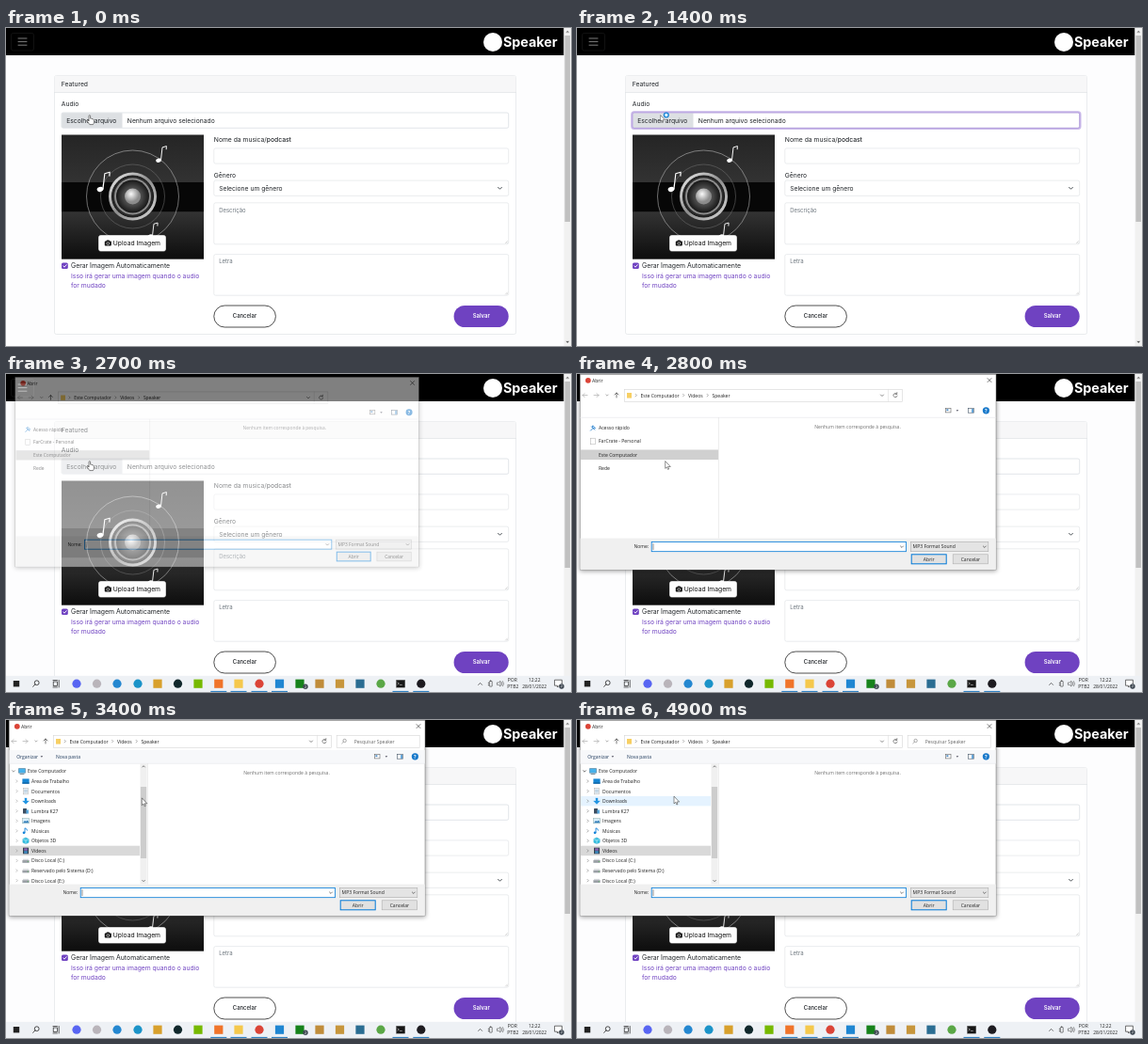
Animation of 600x338 px, one loop 5 s. Source, as an HTML page:

```html
<!DOCTYPE html>
<html lang="pt-BR">
<head>
<meta charset="utf-8">
<title>Envio de áudio</title>
<style>
  html, body { margin: 0; width: 100%; height: 100%; overflow: hidden; background: #fdfdfe; }
  svg { display: block; width: 100vw; height: 100vh; }
  text { white-space: pre; }
  .web { font-family: Inter, "Open Sans", sans-serif; }
  .sys { font-family: "Open Sans", "Noto Sans", sans-serif; }
</style>
</head>
<body>
<svg id="stage" viewBox="0 0 600 338" preserveAspectRatio="none"></svg>
<script>
const PURPLE = '#6f42c1', LINE = '#dcdfe3', BLUE = '#0078d7';

// Shape helpers
const rect = (x, y, w, h, fill, stroke = 'none', r = 0, sw = .6) =>
  `<rect x="${x}" y="${y}" width="${w}" height="${h}" rx="${r}" fill="${fill}" stroke="${stroke}" stroke-width="${sw}"/>`;
const circle = (x, y, r, fill, stroke = 'none', sw = .6) =>
  `<circle cx="${x}" cy="${y}" r="${r}" fill="${fill}" stroke="${stroke}" stroke-width="${sw}"/>`;
const path = (d, stroke, sw = .7, fill = 'none') =>
  `<path d="${d}" fill="${fill}" stroke="${stroke}" stroke-width="${sw}" stroke-linecap="round" stroke-linejoin="round"/>`;
const label = (cls, x, y, s, size, fill, weight, anchor = 'start') =>
  `<text class="${cls}" x="${x}" y="${y}" font-size="${size}" fill="${fill}" font-weight="${weight}" text-anchor="${anchor}">${s}</text>`;
const web = (x, y, s, size = 6.75, fill = '#212529', weight = 400, anchor) =>
  label('web', x, y, s, size, fill, weight, anchor);
const sys = (x, y, s, size = 5.05, fill = '#222', anchor) =>
  label('sys', x, y, s, size, fill, 400, anchor);
const group = (id, s, attrs = '') => `<g id="${id}" ${attrs}>${s}</g>`;
const at = (x, y, s) => `<g transform="translate(${x} ${y})">${s}</g>`;
const down = (x, y, c = '#444', k = 1.6, sw = .7) => path(`M${x - k} ${y - k / 2}l${k} ${k}l${k} ${-k}`, c, sw);
const right = (x, y, c = '#777', k = 1.3) => path(`M${x - k / 2} ${y - k}l${k} ${k}l${-k} ${k}`, c, .6);
const lens = (x, y, r, c, sw) => circle(x, y, r, 'none', c, sw) + path(`M${x - r * .7} ${y + r * .7}l${-r} ${r}`, c, sw);

const defs = `<defs>
  <linearGradient id="wall" x2="0" y2="1"><stop stop-color="#252525"/><stop offset="1" stop-color="#484848"/></linearGradient>
  <linearGradient id="floor" x2="0" y2="1"><stop stop-color="#333"/><stop offset="1" stop-color="#0d0d0d"/></linearGradient>
  <linearGradient id="rim" x2="1" y2="1"><stop stop-color="#f2f2f2"/><stop offset=".5" stop-color="#8d8d8d"/><stop offset="1" stop-color="#dedede"/></linearGradient>
  <radialGradient id="cone"><stop stop-color="#777"/><stop offset=".6" stop-color="#444"/><stop offset="1" stop-color="#171717"/></radialGradient>
  <radialGradient id="cap" cx=".4" cy=".35"><stop stop-color="#fafafa"/><stop offset="1" stop-color="#8c8c8c"/></radialGradient>
  <filter id="soft" x="-5%" y="-5%" width="110%" height="115%"><feGaussianBlur stdDeviation="2.5"/></filter>
</defs>`;

function note(x, y, k) {
  return at(x, y, `<g transform="scale(${k})">` +
    '<ellipse cx="-2.6" cy="6.5" rx="3" ry="2.2" fill="#fff" transform="rotate(-15 -2.6 6.5)"/>' +
    path('M0 6L1.6 -8L6.2 -9.4L6 -6', '#fff', 1) + '</g>');
}

function cover() {
  return rect(59, 113.5, 151, 132, 'url(#wall)') +
    rect(59, 164, 151, 31.5, '#070707') +
    rect(59, 195.5, 151, 50, 'url(#floor)') +
    circle(134.5, 179, 49, 'none', '#b5b5b5', .6) +
    circle(134.5, 179, 34, 'none', '#777', .5) +
    circle(134.5, 179, 25.5, 'url(#rim)') +
    circle(134.5, 179, 22, '#2a2a2a', '#111', 1) +
    circle(134.5, 179, 19.5, '#8e8e8e') +
    circle(134.5, 179, 17.5, 'url(#cone)') +
    circle(134.5, 179, 8.5, 'url(#cap)') +
    note(164.5, 134.5, .95) + note(103, 164, 1.15) + note(155.5, 215.5, .9);
}

function page() {
  const box = (y, h) => rect(220.8, y, 312.9, h, '#fff', LINE, 1.8);
  const grip = (y) => path(`M530.5 ${y}l2 -2M532 ${y}l.5 -.5`, '#999', .4);
  return rect(0, 0, 600, 338, '#fdfdfe') +
    rect(0, 0, 592.5, 29, '#000') +
    rect(5.5, 5.5, 24, 18.5, 'none', '#1d1d1d', 2) +
    [11, 14.6, 18.2].map(y => path(`M13 ${y}h9`, '#8c8c8c', .9)).join('') +
    circle(517, 15, 10, '#fff') +
    web(528, 20, 'Speaker', 14.3, '#fff', 700) +
    rect(592.5, 0, 7.5, 338, '#f1f1f1') +
    rect(593.4, 8, 5.6, 198, '#c1c1c1') +
    path('M594.8 4.6l1.5 -1.7l1.5 1.7z', '#666', .2, '#666') +
    path('M594.8 333l1.5 1.7l1.5 -1.7z', '#555', .2, '#555') +
    rect(51.5, 50.5, 490, 275, '#fff', LINE, 2) +
    rect(51.8, 50.8, 489.4, 17.6, '#f7f7f8') + path('M51.5 68.5H541.5', LINE, .6) +
    web(58.8, 61.6, 'Featured') +
    web(58.8, 83.2, 'Audio') +
    rect(59, 90, 474.7, 16.3, '#fff', '#ced4da', 1.8) +
    path('M123.5 90.2H60.5Q59.2 90.2 59.2 91.5V104.8Q59.2 106.1 60.5 106.1H123.5z', 'none', 0, '#dde0e3') +
    group('focus', rect(58.1, 89.1, 476.5, 18.1, 'none', '#c9b9e9', 2.6, 1.8) +
      rect(59, 90, 474.7, 16.3, 'none', '#a98fda', 1.8, .7)) +
    web(64.2, 100.6, 'Escolher arquivo') +
    web(128.8, 100.6, 'Nenhum arquivo selecionado') +
    cover() +
    rect(98.5, 220.5, 71, 16.6, '#fdfdfd', '#fff', 2) +
    rect(104.8, 226.6, 7, 4.9, '#111', 'none', .8) + rect(106.6, 225.6, 3.3, 2, '#111', 'none', .5) +
    circle(108.3, 229, 1.4, '#111', '#fff', .6) +
    web(113.8, 231.2, 'Upload Imagem', 6.75, '#111') +
    rect(59, 249.5, 6.8, 6.6, PURPLE, 'none', 1.5) + path('M60.8 252.9l1.2 1.3l2.2 -2.6', '#fff', .9) +
    web(69, 255.2, 'Gerar Imagem Automaticamente', 6.88) +
    web(69, 265.6, 'Isso irá gerar uma imagem quando o audio', 6.78, PURPLE) +
    web(69, 276.2, 'for mudado', 6.78, PURPLE) +
    web(220.8, 121.2, 'Nome da musica/<tspan font-weight="500">podcast</tspan>') +
    box(127.9, 16.2) +
    web(220.8, 159, 'Gênero') +
    box(162.1, 16.3) + web(226.2, 172.6, 'Selecione um gênero') + down(524.5, 170.3, '#343a40', 1.9, .9) +
    box(185.8, 44) + web(226.2, 195.6, 'Descrição', 5.95, '#6c757d') + grip(228.6) +
    box(240.6, 43.6) + web(226.2, 250, 'Letra', 6, '#6c757d') + grip(283) +
    rect(220.8, 295, 65.6, 23, '#fff', '#222', 11.5, .8) +
    web(253.5, 308.4, 'Cancelar', 5.95, '#212529', 500, 'middle') +
    rect(475.6, 295, 58.1, 23, PURPLE, 'none', 11.5) +
    web(504.7, 308.4, 'Salvar', 5.95, '#fff', 600, 'middle');
}

function taskbar() {
  // Plain marks: centre x, colour, round or square
  const marks = [[11, '#222', 0], [75, '#5865f2', 1], [96.5, '#b9b4ba', 1], [118, '#2487d0', 1],
    [140, '#1b93c8', 1], [161, '#d8a02c', 0], [182.5, '#10272b', 1], [204, '#76b900', 0],
    [225.8, '#f0742a', 0], [247, '#f5c84c', 0], [269, '#db4437', 1], [290.5, '#1f86d2', 0],
    [312, '#16821b', 0], [333, '#c08c3a', 0], [354.5, '#c7963c', 0], [376, '#2b6d92', 0],
    [398, '#5aa746', 1], [440.8, '#1d1b20', 1]];
  const badge = (x, y) => circle(x, y, 2.7, '#3f4852') + sys(x, y + 1.4, '2', 3.8, '#fff', 'middle');
  return rect(0, 320.8, 600, 17.2, '#eef1f5') +
    marks.map(([x, c, round]) => {
      const k = x === 11 ? 3.2 : 4.6;
      return round ? circle(x, 329.2, k, c) : rect(x - k, 329.2 - k, 2 * k, 2 * k, c);
    }).join('') +
    [225.8, 247, 269, 290.5, 419, 440.8].map(x => rect(x - 8.5, 336.9, 17, 1.1, '#2f80c2')).join('') +
    lens(32.7, 328.2, 2.4, '#222', .8) +
    rect(50.2, 327, 4.2, 4.4, 'none', '#222', 0, .7) +
    path('M50 325.5h4.4M50 333h4.4M56.2 325.5v7.5', '#222', .7) +
    rect(414.4, 325.2, 9.4, 8, '#161616', '#777', 0, .4) + path('M416 328l1.4 1l-1.4 1M418.4 330.4h2', '#fff', .5) +
    badge(318, 332.2) +
    path('M501.6 330.4l2 -2l2 2', '#333', .7) +
    rect(513.2, 326.5, 3, 5.6, 'none', '#333', .4, .6) + path('M512.2 328.5h1M512.2 330.5h1M514.7 326.5v-1', '#333', .6) +
    path('M521.8 328h1.4l1.8 -1.7v5.8l-1.8 -1.7h-1.4z', '#333', .5) +
    path('M526.3 327.6q1.2 1.6 0 3.2M527.6 326.6q2 2.6 0 5.2', '#333', .5) +
    sys(537.8, 326.9, 'POR', 5, '#222', 'middle') + sys(538.3, 333.9, 'PTB2', 5, '#222', 'middle') +
    sys(561.2, 326.9, '12:22', 4.9, '#222', 'middle') + sys(561.2, 333.9, '28/01/2022', 4.9, '#222', 'middle') +
    path('M583 325.2h7.4v6h-3l-1.8 1.8v-1.8h-2.6z', '#333', .7, '#fff') + badge(590, 332);
}

// Folder tree icons, drawn around 0,0
const sheet = rect(-2.5, -3.3, 5, 6.6, '#fff', '#aaa', 0, .5);
const drive = rect(-3.6, -.5, 7.2, 2.8, '#9a9fa5') + rect(-3, -1.8, 6, 1.3, '#d5d8db') + circle(2.3, 1, .5, '#4ab54a');
const icons = {
  pc: rect(-3.6, -3, 7.2, 4.8, '#46b2ec', '#4b6c82', .3, .5) + path('M-2 3h4', '#5a7484', .8),
  desk: rect(-3.6, -2.6, 7.2, 5.2, '#1685d3') + rect(-3.6, 1.4, 7.2, 1.2, '#0d5e9c'),
  doc: sheet + path('M-1.5 -1.5h3M-1.5 0h3M-1.5 1.5h3', '#5d8fb5', .5),
  load: path('M-1.1 -3.3h2.2v3h2.4l-3.5 3.6l-3.5 -3.6h2.4z', '#1b83d6', .2, '#2196e3'),
  phone: rect(-3, -2.8, 4, 5.6, '#3c4d60', 'none', .5) + rect(.4, -1.2, 2.6, 4, '#5aa9dd'),
  pic: rect(-3.6, -2.6, 7.2, 5.2, '#d9eefc', '#8aa', 0, .5) + path('M-3 2l2 -2.4l1.4 1.2l1.4 -1.5l1.4 2.7z', 'none', 0, '#2b79b5'),
  song: path('M-1 2V-3q2 .4 2.6 2.4', '#1683d8', .9) + circle(-2, 2, 1.3, '#1683d8'),
  cube: path('M0 -3.4l3.2 1.6v3.6l-3.2 1.6l-3.2 -1.6v-3.6z', '#1592b8', .3, '#35bfe0') + path('M-3.2 -1.8l3.2 1.5l3.2 -1.5M0 -.3v3.6', '#e5faff', .5),
  film: rect(-3, -3.3, 6, 6.6, '#33424f') + rect(-1.8, -2.6, 3.6, 2.4, '#8b62b5') + rect(-1.8, .3, 3.6, 2.4, '#3f8fc7'),
  drive
};
const tree = [['Este Computador', 'pc'], ['Área de Trabalho', 'desk'], ['Documentos', 'doc'], ['Downloads', 'load'],
  ['Lumbra K27', 'phone'], ['Imagens', 'pic'], ['Músicas', 'song'], ['Objetos 3D', 'cube'], ['Vídeos', 'film'],
  ['Disco Local (C:)', 'drive'], ['Reservado pelo Sistema (D:)', 'drive'], ['Disco Local (E:)', 'drive']];
const STEP = 10.56, rowY = i => 54.5 + i * STEP;
const late = i => i === 4 || i > 5;

function folderTree() {
  const icon = (i, s) => at(i ? 21 : 17, rowY(i), s);
  const pick = (test, draw) => tree.map((row, i) => test(i) ? icon(i, draw(row)) : '').join('');
  const real = row => icons[row[1]];
  return rect(4, rowY(8) - 5.3, 138, 10.5, '#d9d9d9') +
    group('hover', rect(4, -5.3, 138, 10.5, '#e5f3ff')) +
    pick(i => !late(i), real) +
    group('plain', pick(late, () => sheet)) + group('loaded', pick(late, real)) +
    group('arrows', tree.map((_, i) => i ? right(11.6, rowY(i)) : down(8, rowY(0), '#333', 1.4)).join('')) +
    tree.map(([name], i) => sys(i ? 27 : 23, rowY(i) + 1.9, name)).join('') +
    rect(142.5, 46.5, 7, 128, '#f0f0f0') + rect(142.9, 71, 6.2, 76, '#cdcdcd') +
    path('M144.8 50l1.3 -1.3l1.3 1.3M144.8 170.4l1.3 1.3l1.3 -1.3', '#444', .7);
}

function firstTree() {
  const names = [['Acesso rápido', 57.6], ['FarCrate - Personal', 71.5], ['Este Computador', 86], ['Rede', 99.9]];
  return rect(4, 80.5, 146, 10.6, '#d0d0d0') +
    names.map(([s, y]) => sys(23, y + 1.8, s)).join('') +
    at(17, 57.6, path('M-2.5 2.5L0 0M-1.5 -1.6l3.2 3.2M0 -2.5l2.5 2.5l-1.4 .6l-1.7 -1.7z', '#2a83d0', .9)) +
    at(17, 71.5, sheet);
}

function dialog() {
  const crumb = [67.5, 118, 143.5].map((x, i) =>
    right(x - 4.8, 22.6) + sys(x, 24.5, ['Este Computador', 'Vídeos', 'Speaker'][i])).join('');
  return rect(3, 1.5, 442.5, 208, '#000', 'none', 0).replace('/>', ' opacity=".38" filter="url(#soft)"/>') +
    rect(3.2, .2, 441.8, 207.8, '#fff', '#777', 0, .5) +
    circle(11.8, 6.8, 2.9, '#db4437') + sys(16, 8.7, 'Abrir') +
    path('M436 4.6l4 4M440 4.6l-4 4', '#222', .6) +
    path('M11 22.6h-5M8 20.6l-2 2l2 2', '#aaa', .7) + path('M18 22.6h5M21 20.6l2 2l-2 2', '#aaa', .7) +
    down(32, 22.6, '#888', 1.2) + path('M42 25v-5M40 22l2 -2l2 2', '#444', .7) +
    rect(50.5, 16.3, 295, 13, '#fff', '#d5d5d5') + path('M330.5 16.3v13', '#ddd', .6) +
    rect(53, 20, 5, 5.6, '#f7cf63') + crumb +
    down(324, 22.8, '#555', 1.5) +
    path('M339.6 21.2a2.1 2.1 0 1 0 .5 1.9M339.8 19.6v1.8h-1.8', '#444', .6) +
    group('tools', rect(351.2, 16.3, 88, 13, '#fff', '#d5d5d5') +
      lens(359.6, 22, 1.7, '#777', .6) + sys(369.7, 24.5, 'Pesquisar Speaker', 5, '#666') +
      rect(3.5, 32, 441.2, 14, '#f7f8fa') +
      sys(11.2, 40.8, 'Organizar', 5, '#1e395b') + path('M36.6 38.2h2.6l-1.3 1.5z', 'none', 0, '#445') +
      sys(53, 40.8, 'Nova pasta', 5, '#1e395b')) +
    path('M3.5 46.3H444.8', '#e2e4e8', .6) +
    rect(391.5, 36.4, 5.5, 4.5, '#fff', '#666') + rect(392.4, 37.3, 2, 1.8, '#4a8ac2') +
    path('M402.6 38.2h2.6l-1.3 1.5z', 'none', 0, '#445') +
    rect(415.3, 36.4, 6, 4.8, '#fff', '#456') + rect(419, 37, 2, 4, '#65a5d8') +
    circle(434.4, 38.8, 3.6, '#1979ca') + label('sys', 434.4, 40.9, '?', 5.4, '#fff', 700, 'middle') +
    group('first', firstTree()) + group('full', folderTree()) +
    path('M150.4 46.5V174.5', '#dedede', .6) +
    sys(298, 57.6, 'Nenhum item corresponde à pesquisa.', 5.05, '#6d6d6d', 'middle') +
    rect(3.5, 174.6, 441.2, 33.2, '#f0f0f0') +
    sys(60.5, 185.4, 'Nome:') +
    rect(79.2, 178.4, 270.4, 10.3, '#fff', BLUE, 0, .8) + path('M81 180.6v6', '#222', .5) + down(345, 183.7, '#444', 1.5) +
    rect(354.4, 178.4, 82.4, 10.3, '#e4e4e4', '#adadad') + sys(356.6, 185.4, 'MP3 Format Sound') + down(432.8, 183.7, '#444', 1.5) +
    rect(355.2, 191.8, 37, 10, '#e1e1e1', BLUE, 0, 1) + sys(373.7, 198.7, 'Abrir', 5.05, '#222', 'middle') +
    rect(399.2, 191.8, 37.4, 10, '#e1e1e1', '#adadad') + sys(417.9, 198.7, 'Cancelar', 5.05, '#222', 'middle');
}

const arrow = path('M0 0V7.4L1.7 5.9L2.9 8.5L4 8L2.9 5.5H5.2z', '#222', .5, '#fff');
const pointers = group('arrow', arrow) +
  group('hand', path('M-.6 5.2V.6q0 -.9 .8 -.9t.8 .9V3.2q1.4 -.3 1.5 .4q1.2 -.2 1.3 .5q1 0 1 1V7q0 1.5 -1 2.6H.2L-2.2 6.2q-.7 -1.2 .2 -1.5q.7 0 1.4 1z', '#222', .55, '#fff')) +
  group('busy', `<g transform="scale(.85)">${arrow}</g>` + circle(6.2, -.5, 2.4, '#d9f1ff', '#1e86d6', 1.4));

const stage = document.getElementById('stage');
stage.innerHTML = defs + page() + group('bar', taskbar()) + group('dialog', dialog()) + group('pointer', pointers);
const parts = {};
stage.querySelectorAll('g[id]').forEach(g => parts[g.id] = g);

const LOOP = 5000;
const clamp = v => Math.max(0, Math.min(1, v));
const ease = v => v * v * (3 - 2 * v);
const fade = (name, v) => parts[name].setAttribute('opacity', v);
const show = (name, on) => parts[name].setAttribute('visibility', on ? 'inherit' : 'hidden');
const move = (name, s) => parts[name].setAttribute('transform', s);

// Pointer stops: time, x, y
const stops = [[0, 88.6, 93], [2700, 88.6, 93], [2900, 98.8, 93], [3100, 98.8, 93],
  [3700, 189.8, 73.5], [4200, 189.8, 73.5], [4800, 103, 81.5], [LOOP, 103, 81.5]];

function pointerAt(t) {
  const i = stops.findIndex(s => s[0] > t);
  const [t0, x0, y0] = stops[i - 1], [t1, x1, y1] = stops[i];
  const k = ease((t - t0) / (t1 - t0));
  return [x0 + (x1 - x0) * k, y0 + (y1 - y0) * k];
}

function draw(now) {
  const t = Math.floor(now % LOOP / 100) * 100;
  const [x, y] = pointerAt(t);
  const inTree = t >= 2900 && x < 142;
  const row = Math.round((y + 3.2 - rowY(0)) / STEP);

  fade('focus', clamp((t - 1200) / 200) * clamp((2100 - t) / 200));
  show('bar', t >= 2000);

  const open = clamp((t - 2600) / 200);
  const scale = .94 + .06 * open;
  fade('dialog', open);
  show('dialog', open > 0);
  move('dialog', `translate(224 104) scale(${scale}) translate(-224 -104)`);
  show('first', t < 2900);
  show('full', t >= 2900);
  show('tools', t >= 2900);
  show('plain', t < 3100);
  show('loaded', t >= 3100);
  fade('arrows', inTree ? 1 : clamp((150 - x) / 8));
  show('hover', inTree && row !== 8);
  move('hover', `translate(0 ${rowY(row)})`);

  const busy = t >= 1300 && t < 2600, arrowOn = t >= 2800;
  show('busy', busy);
  show('arrow', arrowOn);
  show('hand', !busy && !arrowOn);
  move('pointer', `translate(${x} ${y})`);
}

const start = performance.now();
function tick() {
  draw(performance.now() - start);
  requestAnimationFrame(tick);
}
tick();
</script>
</body>
</html>
```
